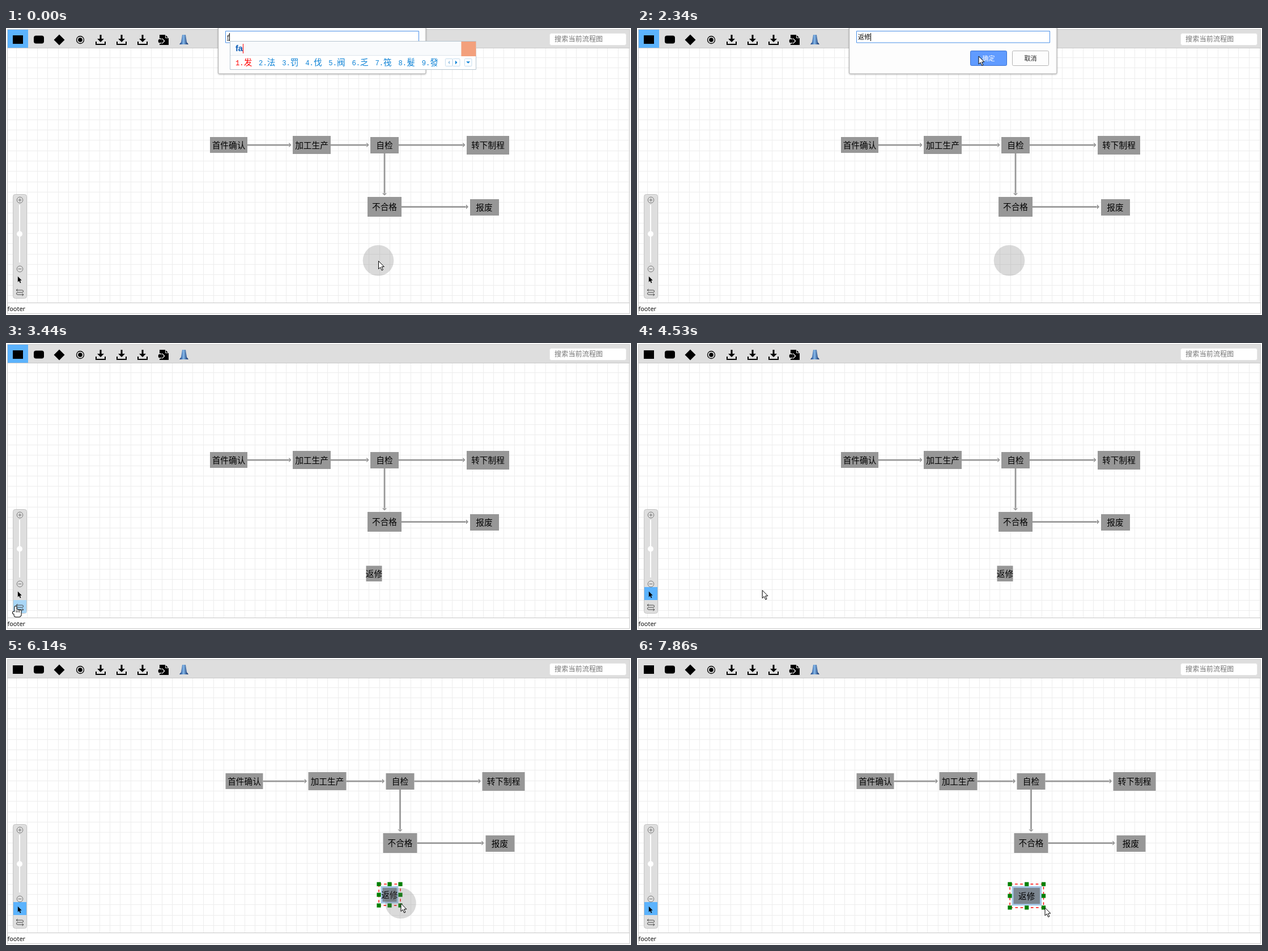
Write an HTML page with a canvas that moves like this. It is 1103x508 px and loops after 8 s.

```html
<!DOCTYPE html>
<html lang="zh">
<head>
<meta charset="utf-8">
<title>Flow chart editor</title>
<style>
html, body { margin: 0; width: 100%; height: 100%; overflow: hidden; background: #fff; }
canvas { display: block; width: 1103px; height: 508px; }
</style>
</head>
<body>
<canvas id="stage"></canvas>
<script>
const W = 1103, H = 508, LOOP = 8000;
const canvas = document.getElementById('stage');
const ratio = window.devicePixelRatio || 1;
canvas.width = W * ratio;
canvas.height = H * ratio;
const c = canvas.getContext('2d');

const ZOOM = 0.915, CELL = 20 * ZOOM, SLOT = 40 * ZOOM, EM = 16 * ZOOM;
const CJK = '"Noto Sans CJK SC", "Noto Sans CJK", "Noto Sans CJK JP", sans-serif';
const UI = '"Open Sans", ' + CJK;
const GREY = '#979797', BAR = '#dedede', ACTIVE = '#5cb3fd', HOVER = '#a9d6f6';

// ---- drawing helpers ----
function paint(fill, stroke, width = 1) {
  if (fill) { c.fillStyle = fill; c.fill(); }
  if (stroke) { c.strokeStyle = stroke; c.lineWidth = width; c.stroke(); }
}
function rect(x, y, w, h, fill) {
  c.fillStyle = fill;
  c.fillRect(x, y, w, h);
}
function box(x, y, w, h, r, fill, stroke, width) {
  c.beginPath();
  c.roundRect(x, y, w, h, r);
  paint(fill, stroke, width);
}
function disc(x, y, r, fill, stroke, width) {
  c.beginPath();
  c.arc(x, y, r, 0, Math.PI * 2);
  paint(fill, stroke, width);
}
function poly(points, fill, stroke, width) {
  c.beginPath();
  points.forEach(([x, y]) => c.lineTo(x, y));
  c.closePath();
  paint(fill, stroke, width);
}
function triangle(x, y, r, angle, fill) {
  at(x, y, () => {
    c.rotate(angle);
    poly([[-r / 2, -r], [r / 2, 0], [-r / 2, r]], fill);
  });
}
function line(x1, y1, x2, y2, color, width) {
  c.beginPath();
  c.moveTo(x1, y1);
  c.lineTo(x2, y2);
  paint(null, color, width);
}
function text(str, x, y, font, color, align = 'left') {
  c.font = font;
  c.fillStyle = color;
  c.textAlign = align;
  c.fillText(str, x, y);
  return c.measureText(str).width;
}
function at(x, y, draw) {
  c.save();
  c.translate(x, y);
  draw();
  c.restore();
}

// ---- timing ----
function count(t, t0, t1, n) {
  return t < t0 ? 0 : Math.min(n, 1 + Math.floor((t - t0) / (t1 - t0) * (n - 1) + 1e-6));
}
function progress(t, t0, t1, n) {
  const p = count(t, t0, t1, n) / n;
  return p * p * (3 - 2 * p);
}
const mix = (a, b, p) => a.map((v, i) => v + (b[i] - v) * p);
const within = (t, spans) => spans.some(([a, b]) => t >= a && t < b);

// ---- page ----
function grid() {
  for (let x = CELL; x < 1100; x += CELL) rect(Math.round(x), 36, 1, 450, '#ededed');
  for (let y = 52; y < 486; y += CELL) rect(3, Math.round(y), 1097, 1, '#ededed');
}
function download() {
  rect(-1.5, -9, 3, 8, '#000');
  triangle(0, 1, 6, Math.PI / 2, '#000');
  for (const x of [-9, 7]) rect(x, 3, 2, 6, '#000');
  rect(-9, 7, 18, 2, '#000');
}
function importFile() {
  poly([[-6, -9], [4, -9], [10, -3], [10, 9], [-6, 9]], '#000');
  line(4.5, -9, 4.5, -3.5, BAR);
  line(4, -3.5, 10, -3.5, BAR);
  box(-9, -2, 7, 8, 3, '#000', BAR, 1.5);
  triangle(1, 2, 5.5, 0, BAR);
  triangle(-0.5, 2, 4.5, 0, '#000');
}
function flask() {
  const blue = c.createLinearGradient(-7, 0, 7, 0);
  blue.addColorStop(0, '#173f86');
  blue.addColorStop(0.45, '#86b9ea');
  blue.addColorStop(1, '#12306a');
  poly([[-3, -9], [3, -9], [5, 4], [8, 8], [-8, 8], [-5, 4]], blue);
}
const icons = [
  () => rect(-9, -8, 18, 15, '#000'),
  () => box(-9, -7.5, 18, 14, 4, '#000'),
  () => poly([[0, -9.5], [9.5, 0], [0, 9.5], [-9.5, 0]], '#000'),
  () => { disc(0, 0, 6.5, null, '#000', 1.3); disc(0, 0, 3.8, '#000'); },
  download, download, download, importFile, flask
];
function toolbar(selected) {
  rect(3, 3, 1097, 32, BAR);
  if (selected) rect(3, 3, 36, 32, ACTIVE);
  rect(3, 35, 1097, 1, '#c8c8c8');
  icons.forEach((icon, i) => at(Math.round(21 + SLOT * i), 21, icon));
  box(959.5, 9.5, 135, 21, 3, '#fff', '#e6e6e6');
  text('搜索当前流程图', 968, 24, '12.2px ' + CJK, '#757575');
}
function frame() {
  c.strokeStyle = '#c8c8c8';
  c.lineWidth = 1;
  rect(3, 486, 1097, 20, '#fff');
  c.strokeRect(2.5, 2.5, 1098, 503);
  rect(3, 486, 1097, 1, '#c8c8c8');
  text('footer', 2.5, 500.5, '11px ' + UI, '#000');
}
function zoomIcon(y, plus) {
  disc(24.5, y, 5.3, null, '#777');
  line(21.5, y, 27.5, y, '#777');
  if (plus) line(24.5, y - 3, 24.5, y + 3, '#777');
}
function connectorIcon() {
  c.beginPath();
  c.moveTo(-6, -4);
  c.arc(4, -2, 2, -Math.PI / 2, Math.PI / 2);
  c.arc(-4, 2, 2, -Math.PI / 2, Math.PI / 2, true);
  c.lineTo(6, 4);
  for (const s of [-1, 1]) {
    c.moveTo(4 * s, 2 * s);
    c.lineTo(6.5 * s, 4 * s);
    c.lineTo(4 * s, 6 * s);
  }
  paint(null, '#444');
}
function sidePanel(t) {
  box(12.5, 294.5, 24, 184, 4, BAR, '#c4c4c4');
  if (t >= 3573) rect(13, 432, 23, 23, t < 3840 ? HOVER : ACTIVE);
  if (within(t, [[3440, 3573]])) rect(13, 455, 23, 23, HOVER);
  zoomIcon(304.5, true);
  zoomIcon(426.5, false);
  rect(23, 313, 2, 102, '#fff');
  disc(24, 364.5, 5, '#fff');
  at(20.5, 439.5, () => {
    c.scale(0.7, 0.7);
    poly(arrowShape, '#000');
  });
  at(24.5, 468, connectorIcon);
}

// ---- diagram ----
const node = (name, x, y, w, h) => ({ name, x, y, w, h });
const nodes = [
  node('首件确认', 393, 207, 66, 28), node('加工生产', 539.5, 207, 67, 32),
  node('自检', 668, 207, 50, 29), node('转下制程', 850.5, 207, 75, 33),
  node('不合格', 668, 316.5, 60, 35), node('报废', 844, 317.5, 51, 29)
];
const links = [[0, 1], [1, 2], [2, 3], [2, 4], [4, 5]];
function label(str, x, y) {
  text(str, x, y + 5.5, EM + 'px ' + CJK, '#000', 'center');
}
function link(a, b) {
  const down = a.x === b.x;
  const start = down ? a.h / 2 : a.w / 2;
  const end = down ? b.y - a.y - b.h / 2 : b.x - a.x - b.w / 2;
  at(a.x, a.y, () => {
    c.rotate(down ? Math.PI / 2 : 0);
    line(start, 0, end - 7, 0, GREY, 2.75);
    triangle(end - 4.5, 0, 4.2, 0, GREY);
    c.scale(2, 1);
  });
}
function diagram() {
  for (const [a, b] of links) link(nodes[a], nodes[b]);
  for (const { name, x, y, w, h } of nodes) {
    rect(Math.round(x - w / 2), Math.round(y - h / 2), w, h, GREY);
    label(name, x, y);
  }
}
// x, y, w, h describe the frame through the resize handles.
function repairNode(x, y, w, h, selected) {
  const m = 5;
  box(x + m, y + m, w - 2 * m, h - 2 * m, 0, selected ? '#7c8690' : GREY, selected && '#a7c9ea', 3);
  label('返修', x + w / 2, y + h / 2);
  if (!selected) return;
  c.setLineDash([5 * ZOOM]);
  c.strokeStyle = '#f00';
  c.lineWidth = 1.4;
  c.strokeRect(x, y, w, h);
  c.setLineDash([]);
  for (const i of [0, 0.5, 1])
    for (const j of [0, 0.5, 1])
      if (i !== 0.5 || j !== 0.5) rect(x + w * i - 3.6, y + h * j - 3.6, 7.2, 7.2, '#008000');
}

// ---- prompt and input method ----
function button(x, str, fill, border, color) {
  box(x + 0.5, 40.5, 64, 26, 2, fill, border);
  text(str, x + 32.5, 57.8, '500 11px ' + CJK, color, 'center');
}
function prompt(value, composing, focused, caret) {
  c.save();
  c.shadowColor = 'rgba(0,0,0,.2)';
  c.shadowBlur = 3;
  c.shadowOffsetY = 1;
  box(374.5, -10, 366.5, 91, 2, '#fdfdfd', '#b4b4b4');
  c.restore();
  box(387.5, 5.5, 341, 20.5, 0, '#fff', focused ? '#4a90e8' : '#b0b0b0');
  const w = text(value, 390, 19.8, '11px ' + UI, '#000');
  if (composing) rect(390, 21, w, 1, '#000');
  if (caret) rect(Math.round(390 + w), 9, 1, 14, '#000');
  button(588, '确定', '#609bff', '#3b72d2', '#fff');
  button(662, '取消', '#fdfdfd', '#b4b4b4', '#222');
}
function navButton(x, angle, color) {
  box(x + 0.5, 54.5, 12.5, 13, 1, '#fff', '#c4dcee');
  triangle(x + 6.7, 61, 3.5, angle, color);
}
function candidates(pinyin, words) {
  const blue = '#0d82d6', gap = 11.8;
  const span = word => EM * (word.length + 1) + gap;
  const end = 405 - gap + words.reduce((sum, word) => sum + span(word), 0);
  const right = end + 67.5;
  box(395.5, 23.5, Math.round(right - 396), 50, 0, '#fff', '#b5c4cf');
  rect(396, 24, right - 397, 24, '#f8fafc');
  rect(396, 48, right - 397, 1, '#dfe6ec');
  const w = text(pinyin, 405, 41.3, `bold ${EM}px "Liberation Sans", sans-serif`, '#0a5bb5');
  rect(Math.round(405 + w), 28, 1, 17, '#f00');
  let x = 405;
  words.forEach((word, i) => {
    const color = i ? blue : '#f00';
    text(i + 1 + '.', x, 66, '12.2px "Liberation Mono", monospace', color);
    text(word, x + EM, 66.2, `300 ${EM}px ${CJK}`, color);
    x += span(word);
  });
  navButton(end + 12, Math.PI, '#a9cbe6');
  navButton(end + 25, 0, blue);
  navButton(end + 46, Math.PI / 2, blue);
  rect(right - 27, 24, 26, 26, '#f3a07c');
}
const first = [...'发法罚伐阀乏筏髮發'];
const common = [...'饭烦反翻犯范凡返番'];
const compounds = {
  4: '反向 返现 翻新 返校 凡心 反相 繁星 翻下 烦心'.split(' '),
  5: ['翻洗', '反洗'],
  6: ['返修', '翻修']
};
function typing(t) {
  if (t >= 1240) return prompt('返修', false, t < 2610, t < 2610);
  const keys = count(t, 140, 690, 4), done = t >= 1120;
  const shown = done ? 6 : 1 + keys;
  const typed = done ? 6 : Math.min(5, 2 + keys);
  const pinyin = 'fanxiu'.slice(0, typed).replace('x', "'x");
  const words = typed < 3 ? first : [...(compounds[typed] || []), ...common].slice(0, 9);
  prompt('fanxiu'.slice(0, shown), true, true, shown < typed);
  candidates(pinyin, words);
}

// ---- mouse ----
const arrowShape = [[0.5, 0.5], [0.5, 14.5], [3.7, 11.5], [6.2, 17], [8.4, 16], [6, 10.7], [10.3, 10.5]];
function pointer() {
  poly(arrowShape, '#fff', '#000');
}
function hand() {
  c.beginPath();
  for (let i = 0; i < 4; i++) c.roundRect(-1.5 + 2.7 * i, i && 5 + 0.6 * i, 3, 10, 1.5);
  c.roundRect(-5, 9.5, 6, 4, 2);
  c.roundRect(-2.5, 9, 11.5, 9.5, 3);
  paint(null, '#000', 2);
  paint('#fff');
  for (let i = 0; i < 3; i++) line(1.3 + 2.7 * i, 7, 1.3 + 2.7 * i, 11, '#000', 0.9);
}
function mouse(t, pan, grow) {
  if (t < 2730) return mix([657, 412], [602.5, 49.5], progress(t, 1650, 2340, 6));
  if (t < 2880) return [299, 250];
  if (t < 3440) return null;
  if (t < 4120) return mix([17, 466], [18, 446], progress(t, 3573, 3840, 3));
  if (t < 5650) return mix([18, 446], [658.5, 418], progress(t, 4120, 5110, 8));
  return [658.5 + 38 * pan + 23 * grow, 418 + 16 * pan + 7.5 * grow];
}
const pressed = [[0, 2730], [5240, 5510], [5650, 6820], [7000, 7190]];

function draw(t) {
  c.setTransform(ratio, 0, 0, ratio, 0, 0);
  rect(0, 0, W, H, '#fff');
  grid();

  const pan = progress(t, 5650, 6140, 4), grow = progress(t, 7500, 7860, 4);
  at(27.5 * pan, 11 * pan, () => {
    diagram();
    if (t >= 2730) repairNode(630.5, 389.3, 38 + 21.5 * grow, 37.7 + 3.8 * grow, t >= 5375);
  });

  toolbar(t < 4120);
  frame();
  sidePanel(t);

  const pos = mouse(t, pan, grow);
  if (within(t, pressed)) {
    const [x, y] = t < 2730 ? [657, 411.5] : pos;
    disc(x, y, 27.3, 'rgba(110,110,110,.25)');
  }
  if (t < 2730) typing(t);
  if (pos) at(...pos, t >= 3440 && t < 4120 ? hand : pointer);
}

const start = performance.now();
function tick() {
  draw((performance.now() - start) % LOOP);
  requestAnimationFrame(tick);
}
tick();
</script>
</body>
</html>
```
